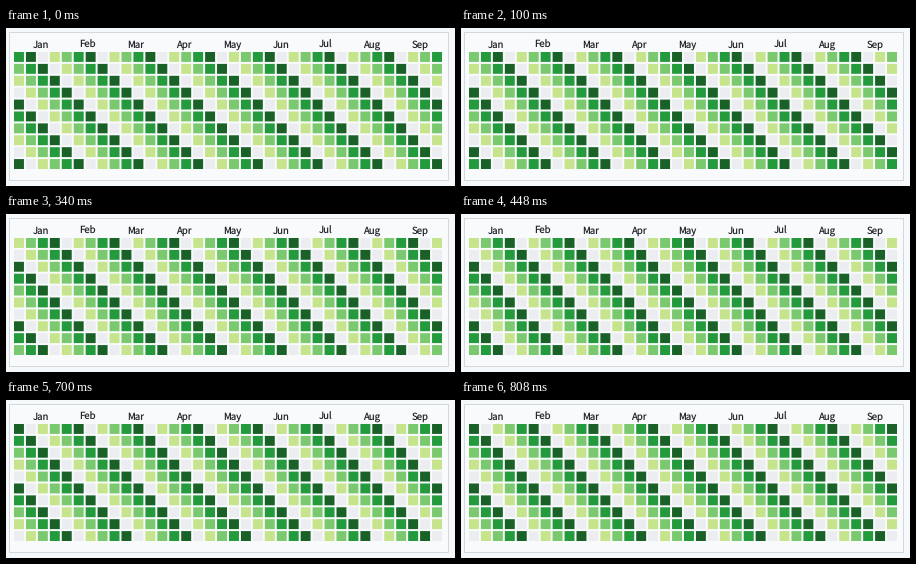
A matplotlib script for the animation above (880 ms loop, 449 by 158 pixels).

```python
import matplotlib.pyplot as plt
import numpy as np
from matplotlib.animation import FuncAnimation
from matplotlib.collections import PolyCollection
from matplotlib.patches import Rectangle

W, H, DPI = 449, 158, 100
STEP, LOOP = 20, 880
SHIFT_TIMES = np.array([100, 340, 520, 700])

COLS, ROWS = 36, 10
LEFT, TOP, RIGHT, BOTTOM = 8, 24, 436, 141
FILL = 10 / 12  # share of the pitch covered by a cell
LEVELS = np.array(["#ebedf0", "#c6e48b", "#7bc96f", "#239a3b", "#196127"])
MONTHS = "Jan Feb Mar Apr May Jun Jul Aug Sep".split()
MONTH_X = [27, 73, 121, 170, 217, 267, 313, 357, 406]

plt.rcParams["text.hinting"] = "none"
fig = plt.figure(figsize=(W / DPI, H / DPI), dpi=DPI, facecolor="#f6f9fb")
ax = fig.add_axes([0, 0, 1, 1])
ax.set(xlim=(0, W), ylim=(H, 0))
ax.axis("off")


def px(size):
    return size * 72 / DPI


def spans(start, end, count):
    """Start and end of each of `count` evenly pitched cells."""
    pitch = (end - start) / (count - 1 + FILL)
    a = start + pitch * np.arange(count)
    return list(zip(a, a + pitch * FILL))


ax.add_patch(Rectangle((3.5, 4.5), 439, 148, facecolor="#f8fafb",
                       edgecolor="#d1d9dc", linewidth=px(1), snap=False))

for name, x in zip(MONTHS, MONTH_X):
    ax.text(x, 20, name, fontsize=px(9.6), color="#24292e",
            family="Noto Sans CJK JP", va="baseline")

# Cells keep their fractional edges, so neither snapping nor rounding here.
boxes = [[(x0, y0), (x1, y0), (x1, y1), (x0, y1)]
         for y0, y1 in spans(TOP, BOTTOM, ROWS)
         for x0, x1 in spans(LEFT, RIGHT, COLS)]
cells = PolyCollection(boxes, linewidths=0, antialiaseds=True, snap=False)
ax.add_collection(cells, autolim=False)

row, col = np.mgrid[:ROWS, :COLS]


def update(frame):
    shift = np.sum(frame * STEP >= SHIFT_TIMES)
    level = (col - row + 3 - shift) % len(LEVELS)
    cells.set_facecolor(LEVELS[level.ravel()])
    return [cells]


anim = FuncAnimation(fig, update, frames=LOOP // STEP, interval=STEP,
                     repeat=True, repeat_delay=0)
plt.show()
```
